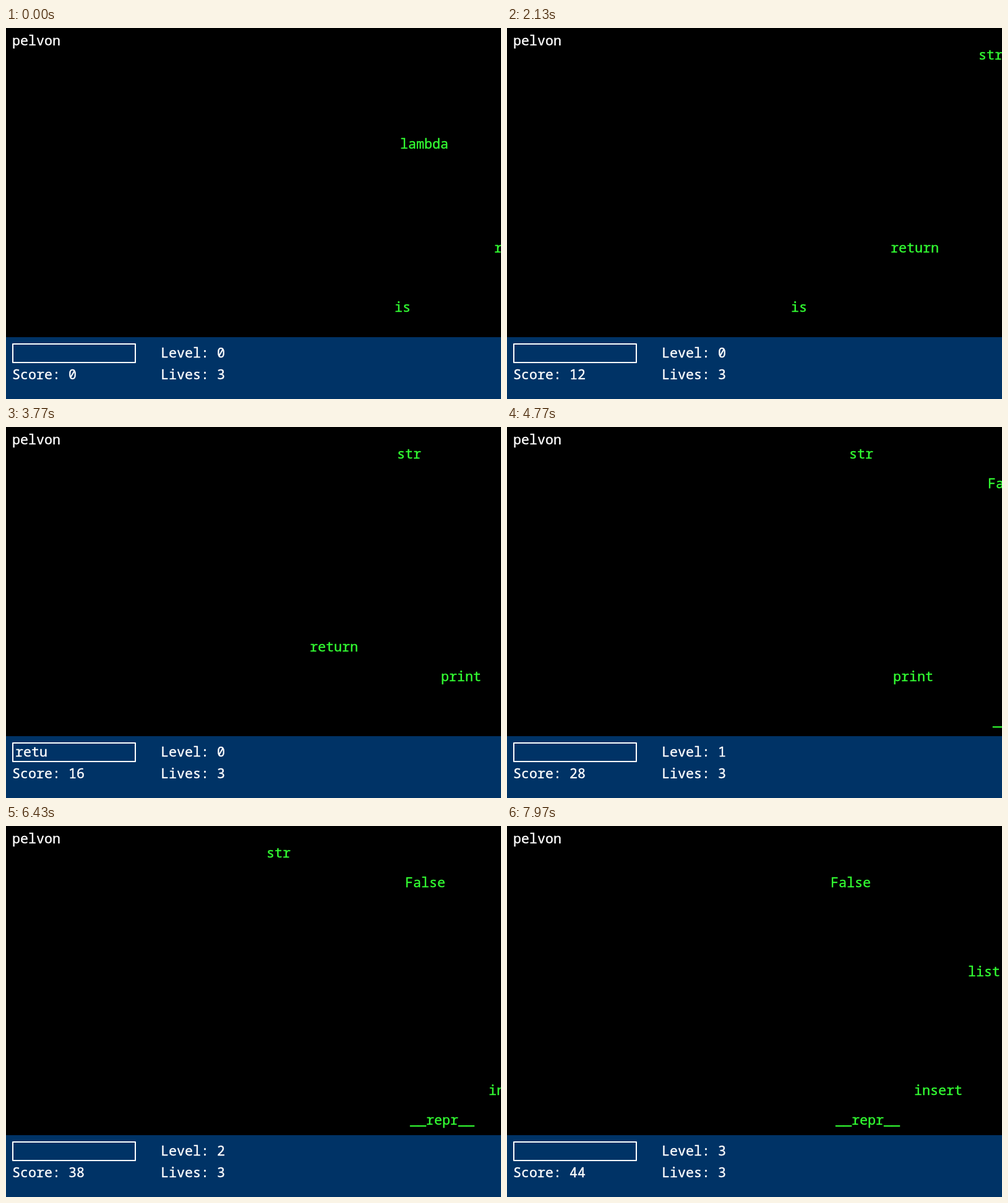
Animation of 800 by 600 pixels, one loop 8000 ms. Source, as an HTML page with a canvas:

```html
<!DOCTYPE html>
<html lang="en">
<head>
<meta charset="utf-8">
<title>Typing game</title>
<style>
  html, body { margin: 0; width: 100%; height: 100%; overflow: hidden; background: #000; }
  canvas { display: block; }
</style>
</head>
<body>
<canvas id="stage" width="800" height="600"></canvas>
<script>
const ctx = document.getElementById('stage').getContext('2d');
const LOOP = 8000;
const STEP = 100 / 3;
const SPEED = 0.0792; // px per ms
const GREEN = '#33ff33';
const WHITE = '#ffffff';
const PANEL = '#003366';

// x is the word's left edge at time `at`; it vanishes at `end`
const words = [
  { text: 'lambda',   row: 6,  at: 0,    x: 637,   end: 1600 },
  { text: 'is',       row: 17, at: 0,    x: 628,   end: 2480 },
  { text: 'return',   row: 13, at: 0,    x: 789,   end: 4560 },
  { text: 'str',      row: 0,  at: 2130, x: 762,   end: 7490 },
  { text: 'print',    row: 15, at: 3770, x: 703,   end: 5860 },
  { text: 'False',    row: 2,  at: 5730, x: 700.6, end: LOOP },
  { text: '__repr__', row: 18, at: 5730, x: 708.6, end: LOOP },
  { text: 'insert',   row: 16, at: 7170, x: 721.5, end: LOOP },
  { text: 'list',     row: 8,  at: 7970, x: 745,   end: LOOP }
];

// Key press times per word, in typing order
const typing = [
  { text: 'lambda', keys: [500, 640, 790, 930, 1070, 1230], end: 1600 },
  { text: 'is',     keys: [2180, 2300], end: 2480 },
  { text: 'return', keys: [3250, 3420, 3570, 3720, 3920, 4150], end: 4560 },
  { text: 'print',  keys: [5100, 5230, 5350, 5480, 5620], end: 5860 },
  { text: 'str',    keys: [6760, 6920, 7080], end: 7490 }
];

const levelUps = [4590, 5890, 7520];

// A hairline outline gives the glyphs their slightly heavy weight
function label(text, x, baseline, color = WHITE) {
  ctx.fillStyle = ctx.strokeStyle = color;
  ctx.lineWidth = 0.4;
  ctx.fillText(text, x, baseline);
  ctx.strokeText(text, x, baseline);
}

function typedText(t) {
  const entry = typing.find(e => t >= e.keys[0] && t < e.end);
  return entry ? entry.text.slice(0, entry.keys.filter(k => k <= t).length) : '';
}

function draw(t) {
  ctx.font = '21.667px "Noto Sans Mono", "DejaVu Sans Mono", monospace';
  ctx.textBaseline = 'alphabetic';
  ctx.lineJoin = 'round';
  ctx.fillStyle = '#000';
  ctx.fillRect(0, 0, 800, 600);

  for (const w of words) {
    const x = Math.round(w.x - (t - w.at) * SPEED);
    if (t < w.end && x < 800) label(w.text, x, 51 + w.row * 24, GREEN);
  }
  label('pelvon', 10, 28);

  ctx.fillStyle = PANEL;
  ctx.fillRect(0, 500, 800, 100);
  ctx.strokeStyle = WHITE;
  ctx.lineWidth = 2;
  ctx.strokeRect(11, 511, 198, 30);

  const score = typing.reduce((sum, e) => sum + (t >= e.end ? e.text.length * 2 : 0), 0);
  const level = levelUps.filter(time => time <= t).length;
  label(typedText(t), 15, 533);
  label('Score: ' + score, 10, 568);
  label('Level: ' + level, 250, 533);
  label('Lives: 3', 250, 568);
}

const start = performance.now();
function tick() {
  const t = (performance.now() - start) % LOOP;
  draw(Math.floor(t / STEP + 0.1) * STEP);
  requestAnimationFrame(tick);
}
tick();
</script>
</body>
</html>
```
